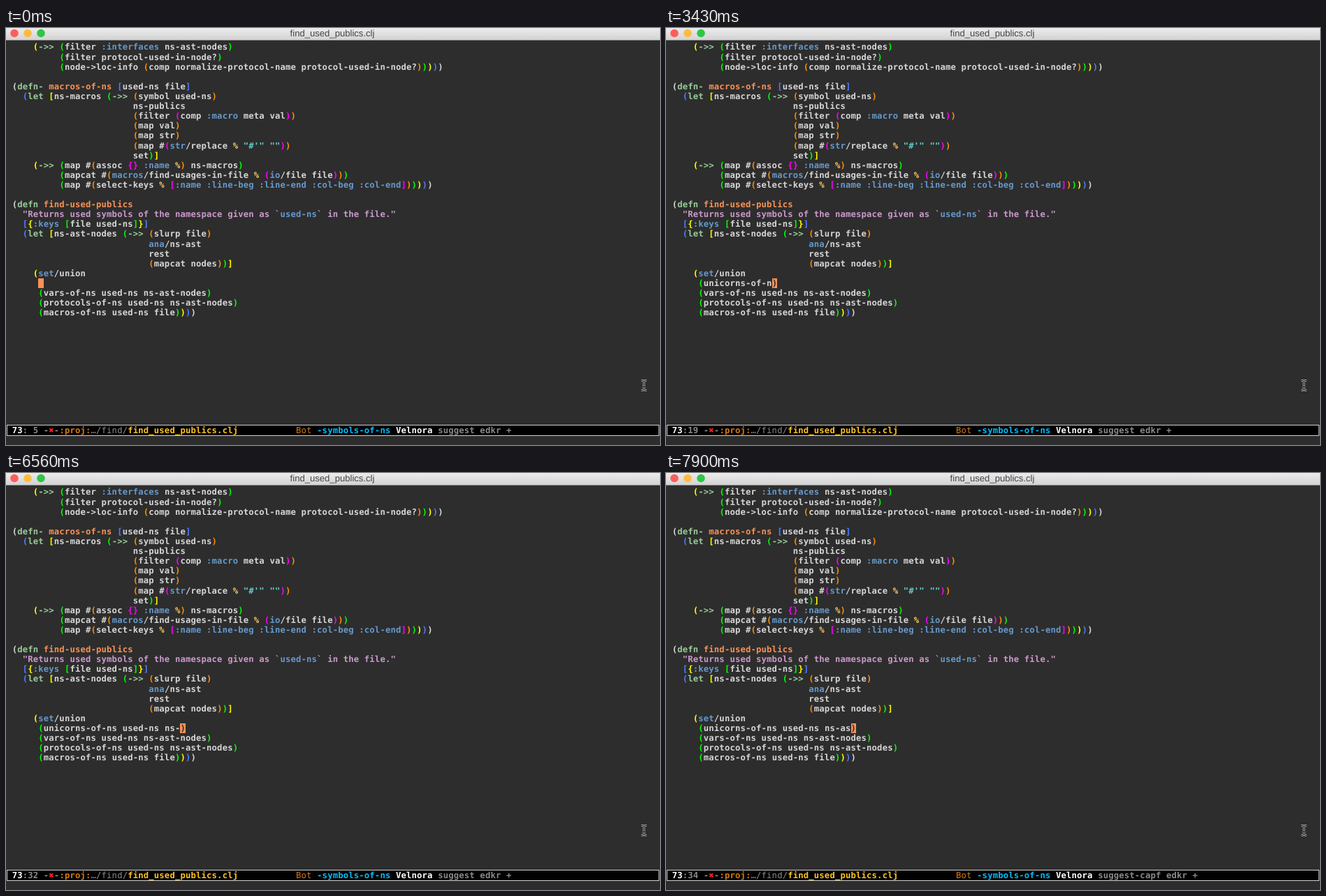
Recreate the animation shown at these times as an HTML page. Size 936x598 px, loop 8 s.

```html
<!DOCTYPE html>
<html lang="en">
<head>
<meta charset="utf-8">
<title>Editor</title>
<style>
  html, body { margin: 0; width: 100%; height: 100%; overflow: hidden; background: #2d2d2d; }
  svg { display: block; width: 936px; height: 598px; }
  text {
    font: bold 12.25px "DejaVu Sans Mono", monospace;
    letter-spacing: .15px;
    white-space: pre;
    text-rendering: geometricPrecision;
  }
  .thin { font-weight: normal; }
  .title { font: 13.1px "Liberation Sans", sans-serif; letter-spacing: 0; text-anchor: middle; }
</style>
</head>
<body>
<svg id="stage" viewBox="0 0 936 598">
  <defs>
    <linearGradient id="bar" x2="0" y2="1">
      <stop stop-color="#ececec"/><stop offset="1" stop-color="#d2d2d2"/>
    </linearGradient>
  </defs>
  <rect width="936" height="598" fill="#2d2d2d"/>
  <rect width="936" height="17.5" fill="url(#bar)"/>
  <circle cx="12" cy="7.5" r="5.8" fill="#fc5f5a"/>
  <circle cx="31" cy="7.5" r="5.8" fill="#fdbc40"/>
  <circle cx="50" cy="7.5" r="5.8" fill="#2fc548"/>
  <text class="title" x="467" y="12" fill="#454545">find_used_publics.clj</text>
  <g id="code"></g>
  <g id="live"></g>
  <rect x="1.5" y="569.5" width="933" height="15" fill="#000" stroke="#d0d0d0"/>
  <g id="mode"></g>
  <g id="status"></g>
  <g id="popup"></g>
  <g fill="none">
    <path id="beam" d="M909 505.5h2.5l1.5 1.5l1.5-1.5h2.5M913 507v11M909 519.5h2.5l1.5-1.5l1.5 1.5h2.5M911 514.5h4" stroke="#a0a0a0" stroke-width="2.6"/>
    <use href="#beam"/>
    <path d="M909 505.5h2.5l1.5 1.5l1.5-1.5h2.5M913 507v11M909 519.5h2.5l1.5-1.5l1.5 1.5h2.5M911 514.5h4" stroke="#1c1c1c"/>
  </g>
</svg>
<script>
const LOOP = 8000;
const CELL = 7.525, LINE = 14.11, LEFT = 8.65, TOP = 20.1, ASCENT = 11.3;
const MODE_Y = 581.2, ECHO_Y = 596.1;
const FG = '#d6d6d6', BG = '#2d2d2d', GREEN = '#99cc99', BLUE = '#6699cc',
      ORANGE = '#f99157', PURPLE = '#cc99cc', AQUA = '#66cccc', GRAY = '#8a8a8a';
const DEPTHS = [FG, '#4f7cff', '#ffff00', '#00ff00', '#ff8c00', '#ff00ff'];

const SOURCE = String.raw`    (->> (filter :interfaces ns-ast-nodes)
         (filter protocol-used-in-node?)
         (node->loc-info (comp normalize-protocol-name protocol-used-in-node?)))))

(defn- macros-of-ns [used-ns file]
  (let [ns-macros (->> (symbol used-ns)
                       ns-publics
                       (filter (comp :macro meta val))
                       (map val)
                       (map str)
                       (map #(str/replace % "#'" ""))
                       set)]
    (->> (map #(assoc {} :name %) ns-macros)
         (mapcat #(macros/find-usages-in-file % (io/file file)))
         (map #(select-keys % [:name :line-beg :line-end :col-beg :col-end])))))

(defn find-used-publics
  "Returns used symbols of the namespace given as ~used-ns~ in the file."
  [{:keys [file used-ns]}]
  (let [ns-ast-nodes (->> (slurp file)
                          ana/ns-ast
                          rest
                          (mapcat nodes))]
    (set/union

     (vars-of-ns used-ns ns-ast-nodes)
     (protocols-of-ns used-ns ns-ast-nodes)
     (macros-of-ns used-ns file))))`.replace(/~/g, '`').split('\n');

const TYPED = '(unicorns-of-ns used-ns ns-as';
const START = 5, LIVE_ROW = 24, POPUP_COL = 28, POPUP_WIDTH = 31;

// [time, cursor column, cursor hidden, popup shown]
const STEPS = [
  [0, 5], [600, 5, 1], [750, 6], [900, 7], [1200, 8], [1340, 9], [1790, 11],
  [2090, 12], [2240, 13], [2540, 14], [2690, 15], [2990, 16], [3140, 17],
  [3290, 18], [3430, 19], [3580, 20], [3880, 21], [4030, 22], [4180, 23],
  [4320, 24], [4770, 28], [5210, 28, 1], [5510, 29], [5660, 30], [5810, 31],
  [6260, 31, 1], [6560, 32], [7150, 32, 0, 1], [7750, 33], [7900, 34]
];
const ACTIVE_FROM = 7150;

const CORE = '(velnora.core) <f>';
const CHOICES = [
  ['aliases', CORE], ['ast-nodes', '<l>'], ['imports', CORE], ['interns', CORE],
  ['map', CORE], ['name', CORE], ['publics', CORE],
  ['referencing-macro', '<n>'], ['refers', CORE], ['resolve', CORE]
];

const layer = id => document.getElementById(id);
const colX = col => LEFT + col * CELL;
const rowY = row => TOP + row * LINE;

function add(parent, tag, attrs, content = '') {
  const el = document.createElementNS('http://www.w3.org/2000/svg', tag);
  for (const key in attrs) el.setAttribute(key, attrs[key]);
  el.textContent = content;
  parent.append(el);
}

// Writes one run and returns the column after it.
function write(parent, col, y, str, fill, cls = '') {
  add(parent, 'text', { x: colX(col), y, fill, class: cls }, str);
  return col + str.length;
}

function box(parent, col, row, cols, rows, fill) {
  const x = Math.round(colX(col)), y = Math.round(rowY(row));
  add(parent, 'rect', {
    x, y, fill,
    width: Math.round(colX(col + cols)) - x,
    height: Math.round(rowY(row + rows)) - y
  });
}

function tokenColor(token, previous) {
  if (/^defn/.test(previous)) return ORANGE;
  if (/^(defn-?|let|->>)$/.test(token)) return GREEN;
  if (token[0] === ':') return BLUE;
  if (token === '%') return '#ffcc66';
  return FG;
}

// Colours one line; returns the bracket depth at its end.
function highlight(parent, line, row, depth, from = 0) {
  const y = rowY(row) + ASCENT;
  let previous = '';
  for (const match of line.matchAll(/"[^"]*"|[()[\]{}]|[^\s()[\]{}"]+/g)) {
    const token = match[0];
    let col = from + match.index;
    if ('([{'.includes(token)) {
      write(parent, col, y, token, DEPTHS[depth++]);
    } else if (')]}'.includes(token)) {
      write(parent, col, y, token, DEPTHS[--depth]);
    } else if (token[0] === '"') {
      const parts = token.split(/(?<=`)(?=[a-z])|(?<=[a-z])(?=`)/);
      const base = token.includes(' ') ? PURPLE : AQUA;
      parts.forEach((part, i) => { col = write(parent, col, y, part, i === 1 ? BLUE : base); });
    } else if (token.includes('/')) {
      const cut = token.indexOf('/');
      col = write(parent, col, y, token.slice(0, cut), BLUE);
      write(parent, col, y, token.slice(cut), FG);
    } else {
      write(parent, col, y, token, tokenColor(token, previous));
    }
    previous = token;
  }
  return depth;
}

function drawMode() {
  const runs = [
    [0, '73', '#fff'], [2, ':', GRAY], [6, '-', GRAY], [7, '✖', '#ff2020'], [8, '-', GRAY],
    [9, ':proj:', '#d9780f'], [15, '…/find/', GRAY, 'thin'],
    [22, 'find_used_publics.clj', '#ffc125'], [54, 'Bot', '#d9780f', 'thin'],
    [58, '-symbols-of-ns', '#00bfff'], [73, 'Velnora', '#fff']
  ];
  for (const [col, str, fill, cls] of runs) write(layer('mode'), col, MODE_Y, str, fill, cls);
}

function drawLive(cursor, hidden) {
  const g = layer('live');
  const typed = TYPED.slice(0, cursor - START);
  highlight(g, typed && typed + ')', LIVE_ROW, 3, START);
  if (hidden) return;
  box(g, cursor, LIVE_ROW, 1, 1, ORANGE);
  if (typed) write(g, cursor, rowY(LIVE_ROW) + ASCENT, ')', BG);
}

function drawPopup() {
  const g = layer('popup'), top = LIVE_ROW + 1, bar = POPUP_COL + POPUP_WIDTH;
  box(g, POPUP_COL, top, POPUP_WIDTH, CHOICES.length, '#ffff00');
  box(g, POPUP_COL, top, POPUP_WIDTH, 1, '#ffa500');
  box(g, bar, top, 1, CHOICES.length, '#f5d410');
  box(g, bar, top, 1, 8, '#ff1a00');
  CHOICES.forEach(([name, note], i) => {
    const y = rowY(top + i) + ASCENT;
    let col = write(g, POPUP_COL + 1, y, 'ns-', '#ff0000');
    col = write(g, col, y, name, '#000');
    write(g, col + 1, y, note, i ? '#8b1a1a' : '#5a1000');
  });
  const col = write(g, 0, ECHO_Y, 'ns-aliases', ORANGE);
  write(g, col, ECHO_Y, ': ([ns])', FG);
}

function draw([time, cursor, hidden, popup]) {
  for (const id of ['live', 'status', 'popup']) layer(id).replaceChildren();
  drawLive(cursor, hidden);
  write(layer('status'), 3, MODE_Y, String(cursor).padStart(2), GRAY);
  const helper = time >= ACTIVE_FROM ? 'suggest-capf' : 'suggest';
  write(layer('status'), 81, MODE_Y, helper + ' edkr +', GRAY);
  if (popup) drawPopup();
}

let depth = 2;
SOURCE.forEach((line, row) => { depth = highlight(layer('code'), line, row, depth); });
drawMode();

const begin = performance.now();
let shown;
function tick() {
  const time = (performance.now() - begin) % LOOP;
  const step = STEPS.findLast(s => s[0] <= time);
  if (step !== shown) draw(shown = step);
  requestAnimationFrame(tick);
}
tick();
</script>
</body>
</html>
```
